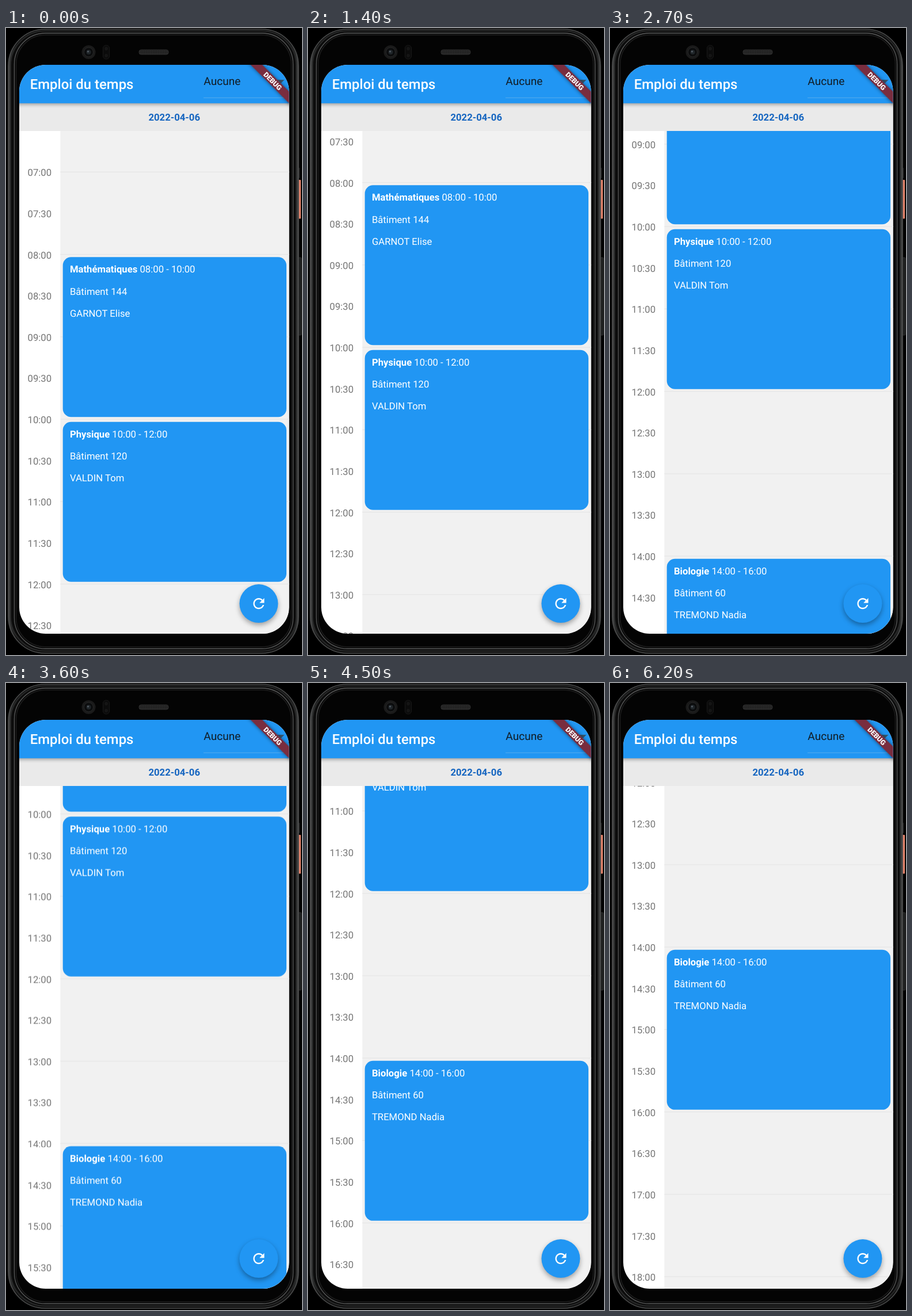
An HTML page for the animation above (8 s loop, 514 by 1090 pixels).

```html
<!DOCTYPE html>
<html lang="fr">
<head>
<meta charset="utf-8">
<title>Emploi du temps</title>
<style>
  html, body { margin: 0; width: 100%; height: 100%; overflow: hidden; background: #000; }
  svg { display: block; width: 514px; height: 1090px; }
  text { font-family: Roboto, sans-serif; font-size: 16.7px; text-rendering: geometricPrecision; }
  .hour { fill: #757575; text-anchor: middle; }
  .event text { fill: #fff; }
  .event rect { fill: #2196f3; }
  .bold { font-weight: 700; }
  .bar { filter: drop-shadow(0 2px 3px rgba(0, 0, 0, .36)); }
  .fab { filter: drop-shadow(0 4px 4px rgba(0, 0, 0, .34)); }
  .ribbon { filter: drop-shadow(0 0 3px rgba(0, 0, 0, .5)); }
</style>
</head>
<body>
<svg viewBox="0 0 514 1090">
  <defs>
    <clipPath id="screen"><rect x="23" y="64" width="468.5" height="989" rx="46"/></clipPath>
    <clipPath id="view"><rect x="23" y="179" width="468.5" height="874"/></clipPath>
    <linearGradient id="rim">
      <stop offset="0" stop-color="#4a4b4b"/>
      <stop offset=".012" stop-color="#2b2c2c"/>
      <stop offset=".03" stop-color="#111"/>
      <stop offset=".97" stop-color="#111"/>
      <stop offset=".99" stop-color="#2b2c2c"/>
      <stop offset="1" stop-color="#4a4b4b"/>
    </linearGradient>
    <pattern id="mesh" width="3" height="3" patternUnits="userSpaceOnUse">
      <rect width="3" height="3" fill="#292929"/>
      <rect width="1.5" height="1.5" fill="#181818"/>
    </pattern>
  </defs>

  <!-- phone body -->
  <rect x="507" y="243" width="3" height="18" rx="1" fill="#222"/>
  <rect x="506" y="264" width="6" height="67.5" rx="1" fill="#e5836b"/>
  <rect x="506" y="399" width="7" height="135" rx="1.5" fill="#1d1e1e" stroke="#333" stroke-width=".8"/>
  <rect x="4" y="2" width="504" height="1085" rx="64" fill="url(#rim)" stroke="#4b4c4c" stroke-width="1.6"/>
  <rect x="8" y="5" width="496" height="1078" rx="60" fill="#0c0c0c" stroke="#272828" stroke-width="2"/>
  <rect x="14.5" y="9" width="484" height="1070" rx="54" fill="#030303" stroke="#5a5b5b" stroke-width="1.3"/>
  <rect x="17.5" y="12" width="478" height="1064" rx="51" fill="#040404" stroke="#191919" stroke-width="2"/>
  <circle cx="143.5" cy="42" r="12" fill="#1a1a1a"/>
  <circle cx="143.5" cy="42" r="8" fill="#0b0c0d" stroke="#282929"/>
  <circle cx="143.5" cy="42" r="4" fill="#20262a"/>
  <circle cx="142.5" cy="41" r="1.4" fill="#59626a"/>
  <rect x="168.5" y="30" width="11" height="24" rx="5" fill="#0b0b0b" stroke="#191919"/>
  <circle cx="174" cy="36" r="3" fill="#151515"/>
  <circle cx="174" cy="48" r="3" fill="#151515"/>
  <rect x="231" y="38" width="51" height="8" rx="3.5" fill="url(#mesh)" stroke="#303030"/>

  <g clip-path="url(#screen)">
    <rect x="23" y="64" width="469" height="990" fill="#fff"/>
    <rect x="94.4" y="179" width="398" height="875" fill="#f1f1f1"/>
    <g clip-path="url(#view)"><g id="list"></g></g>

    <rect x="23" y="130" width="469" height="49" fill="#eaeaea"/>
    <text class="bold" x="292.2" y="160.5" text-anchor="middle" fill="#1565c0">2022-04-06</text>

    <rect class="bar" x="13" y="54" width="489" height="76.8" fill="#2196f3"/>
    <text x="41.8" y="106.3" fill="#fff" style="font-size:23.9px;font-weight:500">Emploi du temps</text>
    <text x="343.3" y="99" fill="#111c25" style="font-size:19.1px">Aucune</text>
    <path d="M343 121.4H492" stroke="#4ba6ee" stroke-width="1.2"/>
    <path d="M471 90h12.4l-6.2 6.2z" fill="#35566f"/>

    <g transform="translate(463.2 92.3) rotate(45)">
      <rect class="ribbon" x="-70" y="-7.2" width="140" height="14.4" fill="#792d3f"/>
      <text y="4.4" text-anchor="middle" fill="#fff" style="font-size:12.2px;font-weight:900">DEBUG</text>
    </g>

    <circle class="fab" cx="438.9" cy="1000.6" r="33.5" fill="#2196f3"/>
    <path transform="translate(424.6 986.3) scale(1.194)" fill="#fff" d="M17.65 6.35C16.2 4.9 14.21 4 12 4c-4.42 0-7.99 3.58-7.99 8s3.57 8 7.99 8c3.73 0 6.84-2.55 7.73-6h-2.08c-.82 2.33-3.04 4-5.65 4-3.31 0-6-2.69-6-6s2.69-6 6-6c1.66 0 3.14.69 4.22 1.78L13 11h7V4l-2.35 2.35z"/>
  </g>
</svg>
<script>
  const LOOP = 8000, STEP = 100, HOUR = 143.26;
  const list = document.getElementById('list');
  const lineY = hour => 250.3 + (hour - 7) * HOUR;

  function add(parent, tag, attrs, text) {
    const el = document.createElementNS('http://www.w3.org/2000/svg', tag);
    for (const key in attrs) el.setAttribute(key, attrs[key]);
    if (text) el.textContent = text;
    return parent.appendChild(el);
  }

  for (let h = 7; h <= 19; h += .5) {
    const y = lineY(h), whole = h % 1 === 0;
    if (whole) add(list, 'path', { d: `M94.4 ${y}H492`, stroke: '#e6e6e6', 'stroke-width': 1.2 });
    const label = String(Math.floor(h)).padStart(2, '0') + (whole ? ':00' : ':30');
    add(list, 'text', { class: 'hour', x: 58.3, y: y + 7 }, label);
  }

  const events = [
    [8, 'Mathématiques', '08:00 - 10:00', 'Bâtiment 144', 'GARNOT Elise'],
    [10, 'Physique', '10:00 - 12:00', 'Bâtiment 120', 'VALDIN Tom'],
    [14, 'Biologie', '14:00 - 16:00', 'Bâtiment 60', 'TREMOND Nadia']
  ];
  for (const [start, title, span, place, teacher] of events) {
    const g = add(list, 'g', { class: 'event', transform: `translate(98.7 ${lineY(start) + 4.7})` });
    add(g, 'rect', { width: 388.3, height: 278, rx: 14.3 });
    const head = add(g, 'text', { x: 12.2, y: 27.2 });
    add(head, 'tspan', { class: 'bold' }, title);
    add(head, 'tspan', {}, ' ' + span);
    add(g, 'text', { x: 12.2, y: 65.4 }, place);
    add(g, 'text', { x: 12.2, y: 103.6 }, teacher);
  }

  // Each swipe: first change (ms), number of steps, resting scroll position
  const swipes = [
    [800, 9, 129.8], [1700, 8, 327.7], [2700, 9, 443],
    [3600, 9, 592.8], [4500, 9, 721.8], [5400, 7, 793.6], [6200, 1, 794]
  ];
  const glide = u => 1 - (1 - u) ** 3 * (1 + 3 * u);

  const frame = (time, y) => ({
    offset: time / LOOP, transform: `translateY(${-y.toFixed(2)}px)`, easing: 'steps(1, end)'
  });
  const frames = [frame(0, 0)];
  let from = 0;
  for (const [start, count, to] of swipes) {
    for (let k = 1; k <= count; k++) {
      frames.push(frame(start + (k - 1) * STEP, from + (to - from) * glide(k / count)));
    }
    from = to;
  }
  frames.push(frame(LOOP, from));
  list.animate(frames, { duration: LOOP, iterations: Infinity });
</script>
</body>
</html>
```
